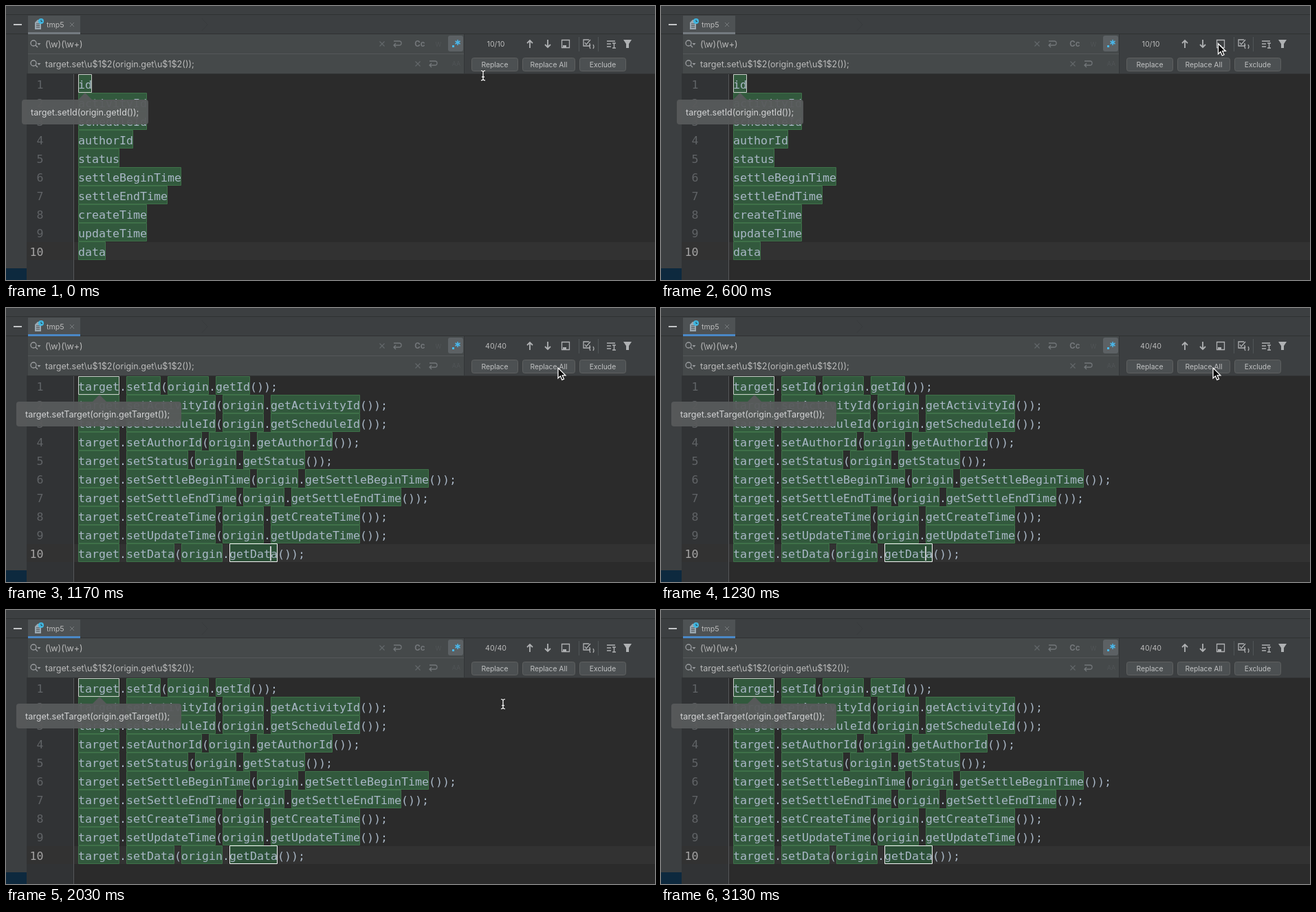
Animation, 944 px wide and 398 px high, one loop 3160 ms. Source, as an HTML page with a canvas:

```html
<!DOCTYPE html>
<html lang="en">
<head>
<meta charset="utf-8">
<title>Regex replace</title>
<style>
  html, body { margin: 0; width: 100%; height: 100%; overflow: hidden; background: #2b2b2b; }
  canvas { display: block; }
</style>
</head>
<body>
<canvas id="stage" width="944" height="398"></canvas>
<script>
const c = document.getElementById('stage').getContext('2d');
const LOOP = 3160, CLICK = 970, REPLACE = 1080, RELEASE = 1110;
const CODE = '16.61px "DejaVu Sans Mono", "Noto Sans Mono", monospace';
const UI = size => size + 'px Inter, Roboto, sans-serif';
const GREEN = '#32593d', GREEN_EDGE = '#3f7149', ICON = '#afb1b3', DIM = '#63676a';

const fields = ['id', 'activityId', 'scheduleId', 'authorId', 'status',
  'settleBeginTime', 'settleEndTime', 'createTime', 'updateTime', 'data'];
const setters = fields.map(f => {
  const name = f[0].toUpperCase() + f.slice(1);
  return `target.set${name}(origin.get${name}());`;
});

// Pointer keys: time, x, y
const path = [[0, 694, 101], [30, 694, 101], [330, 796, 29], [530, 812, 48], [800, 803, 87],
  [1500, 803, 87], [1730, 733, 131], [2000, 722, 138], [2400, 779, 55], [2560, 779, 55], [2630, 782, -22]];

function rect(x, y, w, h, fill) {
  c.fillStyle = fill;
  c.fillRect(x, y, w, h);
}

function box(x, y, w, h, r, fill, edge) {
  c.beginPath();
  c.roundRect(x, y, w, h, r);
  if (fill) { c.fillStyle = fill; c.fill(); }
  if (edge) { c.strokeStyle = edge; c.lineWidth = 1; c.stroke(); }
}

function text(s, x, y, font, fill, align = 'left') {
  c.font = font;
  c.fillStyle = fill;
  c.textAlign = align;
  c.fillText(s, x, y);
}

function draw(d, x, y, color, width = 1.5, fill) {
  const shape = new Path2D(d);
  c.save();
  c.translate(x, y);
  if (fill) { c.fillStyle = fill; c.fill(shape); }
  if (color) { c.strokeStyle = color; c.lineWidth = width; c.stroke(shape); }
  c.restore();
}

function drawTabs(done) {
  rect(0, 0, 944, 398, '#3c3f41');
  rect(0, 12, 944, 1, '#2f3132');
  rect(32, 14, 76, 26, '#4e5254');
  rect(0, 40, 944, 1, '#2f3132');
  rect(32, 38, 76, 3, done ? '#4a88c7' : '#747a80');
  rect(11, 26, 12, 2, '#c4c6c8');
  draw('M4 0H9V14H0V4Z', 42, 20, null, 0, '#9aa7b0');
  draw('M2 6H7M2 8.5H7M2 11H7', 42, 20, '#4e5254', 1);
  draw('M4 0A4 4 0 1 1-4 0A4 4 0 1 1 4 0', 51, 22, null, 0, '#40b6e0');
  draw('M0-2V0.5H2', 51, 22, '#2d4650', 1);
  text('tmp5', 59, 31, UI(10.6), '#bbbbbb');
  draw('M-3-3L3 3M3-3L-3 3', 96, 27, '#777b7d', 1);
  draw('M-4-9L4 0L-4 9', 289, 27, '#383b3d', 1);
}

function drawField(y, clear, wrap) {
  draw('M4 0A4 4 0 1 1-4 0A4 4 0 1 1 4 0M3 3L6 6', 40, y - 1, '#9a9da0', 1.3);
  draw('M-2.5-1H2.5L0 2Z', 48, y, null, 0, '#9a9da0');
  draw('M-3.5-3.5L3.5 3.5M3.5-3.5L-3.5 3.5', clear, y, DIM, 1.2);
  draw('M-5-4H3Q6-4 6-1Q6 2 3 2H-5M-2-1L-5 2L-2 5', wrap, y, '#73777a', 1.3);
}

function button(label, x, w) {
  box(x + .5, 75.5, w - 1, 19, 3, '#4c5052', '#5e6060');
  text(label, x + w / 2, 89, UI(10.3), '#c0c2c3', 'center');
}

function drawFind(done, hover) {
  rect(32, 41, 635, 57, '#45494a');
  rect(32, 69, 635, 1, '#55585a');
  rect(666, 41, 1, 57, '#323537');
  rect(30, 98, 914, 1, '#323435');
  drawField(55, 547, 569);
  drawField(84, 599, 621);
  text('(\\w)(\\w+)', 57, 60, UI(12.6), '#bbbbbb');
  text('target.set\\u$1$2(origin.get\\u$1$2());', 57, 89, UI(12.6), '#bbbbbb');
  text('Cc', 602, 59, 'bold ' + UI(11.5), '#73777a', 'center');
  text('W', 629, 59, UI(9), '#505456', 'center');
  box(643, 43, 22, 23, 3, '#5c6164');
  rect(649, 57, 3, 3, '#4ab8ec');
  draw('M0-4V4M-3.5-2L3.5 2M3.5-2L-3.5 2', 657, 53, '#4ab8ec', 1.5);
  text('AA', 655, 87, UI(9), '#505456', 'center');

  text(done ? '40/40' : '10/10', 712.5, 59, UI(10.6), '#bbbbbb', 'center');
  if (hover) box(777, 44, 22, 22, 3, '#55595c');
  draw('M0 6V-5M-4-1L0-5L4-1', 762, 55, ICON, 1.8);
  draw('M0-6V5M-4 1L0 5L4 1', 788, 55, ICON, 1.8);
  draw('M-5.5-5.5H5.5V5.5H-5.5Z', 814, 55, ICON, 1.3);
  rect(810, 57, 5, 3, ICON);
  rect(833, 45, 1, 21, '#515557');
  draw('M3 0V4H-6V-5H2M-4-1L-2 2L4-5', 846, 54, ICON, 1.3);
  draw('M-2-3Q-4 0-2 3M2-3Q4 0 2 3', 852, 59, ICON, 1.2);
  rect(861, 45, 1, 21, '#515557');
  draw('M-6-4H6M-6 0H0M-6 4H0M2-1H7M2 6H7M4.5-1V6', 880, 55, ICON, 1.4);
  draw('M-6-6H6L2 0V6H-2V0Z', 904, 55, null, 0, ICON);

  button('Replace', 677, 68);
  button('Replace All', 751, 77);
  button('Exclude', 834, 68);
}

function drawEditor(done, t) {
  rect(30, 99, 69, 299, '#313335');
  rect(99, 99, 845, 299, '#2b2b2b');
  rect(30, 343, 914, 26, '#323232');
  rect(98, 99, 1, 299, '#555759');
  rect(0, 381, 30, 17, '#0d293e');
  (done ? setters : fields).forEach((line, i) => {
    const y = 100 + 27 * i;
    text(i + 1, 54.5, y + 19.5, CODE, i === 9 ? '#a4a3a3' : '#606366', 'right');
    for (const m of line.matchAll(/\w\w+/g)) {
      const first = i === 0 && m.index === 0;
      const last = done && i === 9 && m[0] === 'getData';
      const edge = last ? '#f4f4f4' : first ? '#c8cdc9' : GREEN_EDGE;
      box(105.5 + 10 * m.index, y - .5, 10 * m[0].length - 1, 26, 0, last ? '#2c5037' : GREEN, edge);
    }
    text(line, 105, y + 19.5, CODE, '#a9b7c6');
  });
  if (done && t < 1980) rect(384, 346, 2, 21, '#c3c7ca');
}

function drawHint(done) {
  const x = done ? 15 : 23, w = done ? 240 : 184, tip = done ? 136 : 115;
  const fill = 'rgba(88,90,91,.95)';
  draw('M-10 10L0 0L10 10Z', tip, 126, null, 0, fill);
  box(x, 136, w, 36, 4, fill);
  text(done ? 'target.setTarget(origin.getTarget());' : 'target.setId(origin.getId());',
    x + 13, 159, UI(12.6), '#d2d3d4');
}

function pointerAt(t) {
  const n = path.findIndex(k => k[0] > t);
  if (n < 1) return null;
  const [t0, x0, y0] = path[n - 1], [t1, x1, y1] = path[n];
  const u = (t - t0) / (t1 - t0), e = u * u * (3 - 2 * u);
  return { x: x0 + (x1 - x0) * e, y: y0 + (y1 - y0) * e };
}

function ring(x, y, r, color, width) {
  c.beginPath();
  c.arc(x, y, r, 0, 7);
  c.strokeStyle = color;
  c.lineWidth = width;
  c.stroke();
}

function drawPointer(p, t) {
  if (t >= CLICK && t < RELEASE) {
    ring(p.x, p.y + 1, 19.5, '#000', 5);
    ring(p.x, p.y + 1, 19.5, '#fff', 2.4);
  }
  if (p.y > 98) {
    const beam = 'M-3-7Q0-7 0-5Q0-7 3-7M0-5V5M-3 7Q0 7 0 5Q0 7 3 7M-2 2H2';
    draw(beam, p.x, p.y, '#222', 3);
    draw(beam, p.x, p.y, '#eee', 1.4);
  } else {
    draw('M0 0V15L3.4 11.8L5.8 17.3L8.5 16.1L6.1 10.8H10.8Z', p.x, p.y, '#fff', 1.3, '#000');
  }
}

function frame(now) {
  const t = now % LOOP, done = t >= REPLACE, p = pointerAt(t);
  const hover = p && p.x > 776 && p.x < 799 && p.y > 44 && p.y < 66 && t > 2000;
  drawTabs(done);
  drawFind(done, hover);
  drawEditor(done, t);
  drawHint(done);
  if (p) drawPointer(p, t);
}

const start = performance.now();
function tick() {
  frame(performance.now() - start);
  requestAnimationFrame(tick);
}
tick();
</script>
</body>
</html>
```
